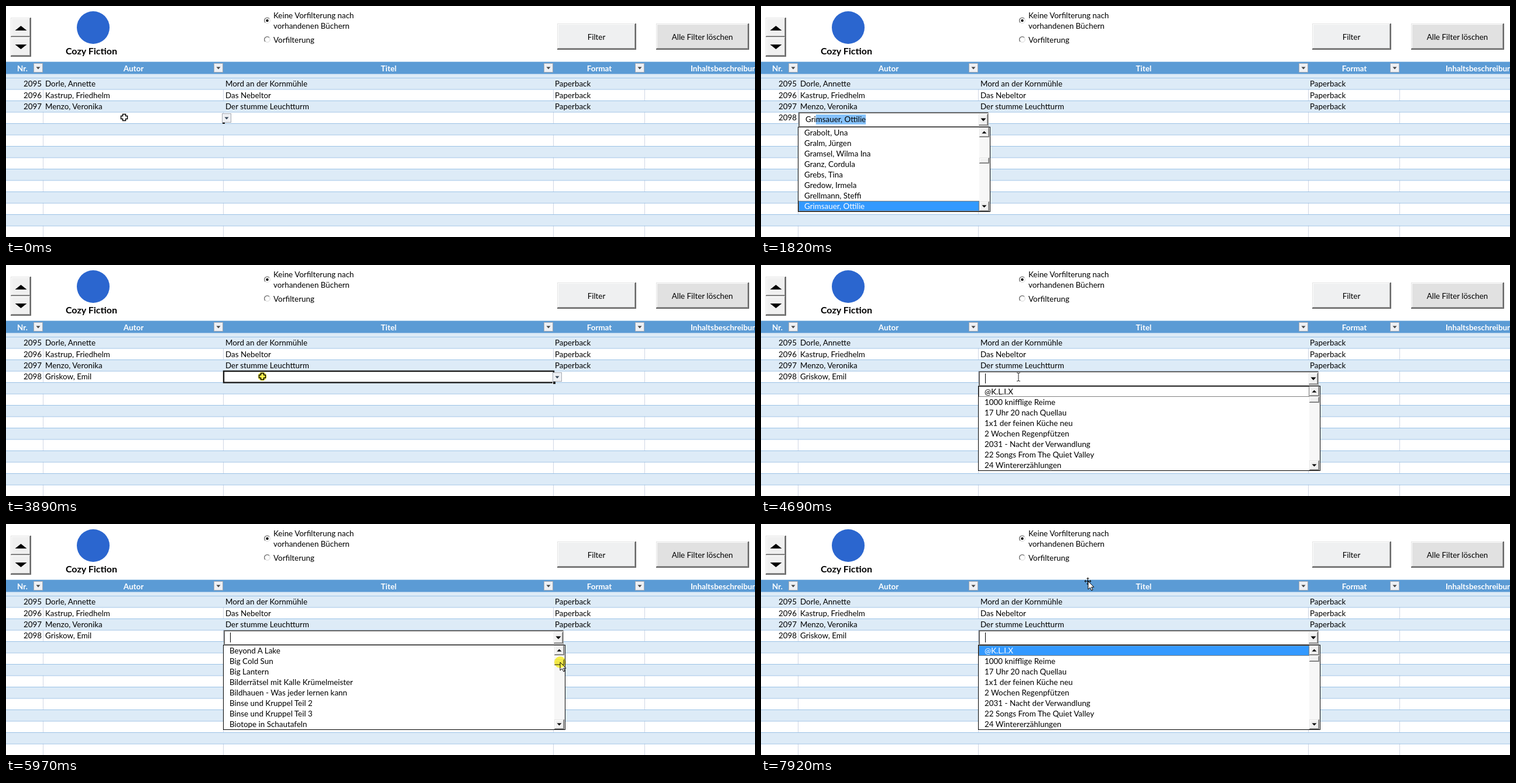
Write an HTML page that moves like this. It is 1280x396 px and loops after 8000 ms.

```html
<!DOCTYPE html>
<html lang="de">
<head>
<meta charset="utf-8">
<title>Bücherliste</title>
<style>
  html, body { margin: 0; width: 100%; height: 100%; overflow: hidden; background: #fff; }
  svg { display: block; width: 1280px; height: 396px; }
  text { font: 13.4px Lato, "Open Sans", sans-serif; white-space: pre; }
  .bold { font-weight: 700; }
  .halo { fill: #fff200; fill-opacity: .7; mix-blend-mode: multiply; }
</style>
</head>
<body>
<svg id="stage" viewBox="0 0 1280 396"><g id="sheet"></g><g id="live"></g></svg>
<script>
const LOOP = 8000;
const COLS = [63, 371, 935, 1091];
const AUTHOR = { x: 64, right: 391 };
const TITLE = { x: 372, right: 955 };
const BLUE = '#3399ff';

const books = [
  ['Dorle, Annette', 'Mord an der Kornmühle'],
  ['Kastrup, Friedhelm', 'Das Nebeltor'],
  ['Menzo, Veronika', 'Der stumme Leuchtturm']
];
const authors = [
  'Abelow, Jutta', 'Abrist, Konrad', 'Adelohm, Vera', 'Ahlpor, Sven', 'Aldruff, Monika',
  'Alpstein, Ruth', 'Amselt, Dirk', 'Andrusch, Karla', 'Fuhlen, Marek', 'Funtz, Berta',
  'Furlow, Denise', 'Fuxel, Sepp', 'Gabrun, Ilse', 'Gattmer, Rolf', 'Gellow, Nadja',
  'Gimpar, Tom', 'Gorbeck, Lutz', 'Grabolt, Una', 'Gralm, Jürgen', 'Gramsel, Wilma Ina',
  'Granz, Cordula', 'Grebs, Tina', 'Gredow, Irmela', 'Grellmann, Steffi',
  'Grimsauer, Ottilie', 'Grindo, Lore', 'Griskow, Emil'
];
const titles = [
  '@K.L.I.X', '1000 knifflige Reime', '17 Uhr 20 nach Quellau', '1x1 der feinen Küche neu',
  '2 Wochen Regenpfützen', '2031 - Nacht der Verwandlung', '22 Songs From The Quiet Valley',
  '24 Wintererzählungen', 'Abends am Mühlbach', 'Alle Wege nach Tannau', 'Am Ufer der Stille',
  'Bald kommt der Schnee', 'Beyond A Lake', 'Big Cold Sun', 'Big Lantern',
  'Bilderrätsel mit Kalle Krümelmeister', 'Bildhauen - Was jeder lernen kann',
  'Binse und Kruppel Teil 2', 'Binse und Kruppel Teil 3', 'Biotope in Schautafeln',
  'Blaue Tinte', 'Brot für den Riesen', 'Bunte Steine im Sand', 'Chor der Krähen', 'Crow Lane',
  'Cura lenta', 'Cuvo', 'Curious Trip Inland', 'Curvino', 'Cycle Of Lanterns',
  'Da singt das halbe Dorf', 'Da blieben noch fünf Äpfel'
];

// Timelines: the last entry whose time has passed is valid.
// Cursor: time, kind, x, y, radius of the click halo.
const cursorLine = [
  [0, 'cross', 202, 191], [270, 'beam', 202, 192], [1430, ''], [2590, 'cross', 202, 191],
  [2990, 'cross', 262, 192], [3110, 'cross', 390, 192], [3220, 'cross', 438, 191],
  [3370, 'cross', 438, 191, 7.5], [4020, 'cross', 438, 191], [4150, 'beam', 440, 192],
  [4920, 'beam', 466, 199], [5060, 'arrow', 700, 223], [5210, 'arrow', 860, 231],
  [5330, 'arrow', 926, 233], [5470, 'arrow', 942, 234], [5580, 'arrow', 946, 233],
  [5700, 'arrow', 946, 232, 10], [5860, 'arrow', 946, 235, 10], [5970, 'arrow', 947, 237, 10],
  [6130, 'arrow', 947, 238, 10], [6730, 'arrow', 946, 237, 10], [7030, 'arrow', 946, 232, 10],
  [7140, 'arrow', 946, 224, 10], [7260, 'arrow', 946, 216, 10], [7420, 'arrow', 946, 216],
  [7690, 'arrow', 885, 227], [7800, 'arrow', 722, 212], [7920, 'move', 559, 98]
];
const typedLine = [[0, 0], [1430, 1], [1690, 2], [1820, 3], [1950, 4], [2070, 5]];
const typedMatch = [0, 12, 17, 24, 26, 26];
const typedThumb = [226, 251, 257, 260, 260, 260];
const scrollLine = [
  [0, 0, 226], [5860, 7, 229], [5970, 12, 232], [6130, 15, 233], [6260, 17, 234],
  [6730, 21, 235], [6860, 24, 235], [7030, 18, 233], [7140, 8, 229], [7260, 0, 226]
];
const hoverLine = [[0, -1], [5060, 0], [5210, 1], [5860, -1], [7690, 1], [7800, 0]];
const caretLine = [
  [0, 0], [270, 1], [900, 0], [4150, 1], [5060, 0], [5580, 1],
  [6130, 0], [6730, 1], [7260, 0], [7690, 1]
];

const at = (line, t) => line.reduce((found, step) => step[0] <= t ? step : found).slice(1);

const rect = (x, y, w, h, fill, extra = '') =>
  `<rect x="${x}" y="${y}" width="${w}" height="${h}" fill="${fill}" ${extra}/>`;
const path = (d, fill, stroke = 'none', extra = '') =>
  `<path d="${d}" fill="${fill}" stroke="${stroke}" ${extra}/>`;
const label = (x, y, s, extra = '') => `<text x="${x}" y="${y}" ${extra}>${s}</text>`;
const centred = (x, y, s, extra = '') => label(x, y, s, `text-anchor="middle" ${extra}`);
const rowTop = i => 123 + 19.5 * i;

function triangle(x, y, r, h, dir = 1, fill = '#000') {
  return path(`M${x - r} ${y - dir * h / 2}H${x + r}L${x} ${y + dir * h / 2}Z`, fill);
}

function raised(x, y, w, h, fill = '#f0f0f0', edge = 1) {
  return rect(x, y, w, h, '#696969') + rect(x, y, w - edge, h - edge, '#e3e3e3') +
    rect(x + 1, y + 1, w - edge - 1, h - edge - 1, '#a0a0a0') +
    rect(x + 1, y + 1, w - edge - 2, h - edge - 2, '#fff') +
    rect(x + 2, y + 2, w - edge - 3, h - edge - 3, fill);
}

const filterButton = (x, y, mark = '#444') =>
  rect(x + .5, y + .5, 15, 15, '#eef0f4', 'stroke="#a5abb5"') + triangle(x + 8, y + 8.5, 3.5, 4, 1, mark);

function radio(y, on) {
  return `<circle cx="446.5" cy="${y}" r="4.7" fill="#fff" stroke="#d5d5d5"/>` +
    path(`M443 ${y + 3.5}A4.8 4.8 0 0 1 450 ${y - 3.5}`, 'none', '#707070', 'stroke-width="1.3"') +
    (on ? `<circle cx="446.5" cy="${y}" r="2.2"/>` : '');
}

function drawSheet() {
  let s = rect(0, 0, 1280, 396, '#fff');
  s += raised(8, 20, 35, 34, '#f0f0f0', 2) + triangle(25.5, 38, 10, 8, -1);
  s += raised(8, 53, 35, 34, '#f0f0f0', 2) + triangle(25.5, 70, 10, 8);
  s += '<circle cx="149" cy="37" r="28" fill="#2b66cf"/>';
  s += centred(146, 83, 'Cozy Fiction', 'class="bold" style="font-size:16px"');
  s += radio(25, true) + radio(57.5, false);
  s += label(457, 21, 'Keine Vorfilterung nach') + label(457, 39, 'vorhandenen Büchern') +
    label(457, 63, 'Vorfilterung');
  s += raised(942, 30, 135, 45, '#eff0f1', 2) + centred(1009, 58, 'Filter');
  s += raised(1111, 30, 159, 45, '#e1e1e1', 2) + centred(1190, 58, 'Alle Filter löschen');

  s += rect(0, 116, 1280, 8, '#ddebf7') + rect(0, 95.6, 1280, 20.4, '#5b9bd5') +
    rect(0, 116, 1280, 1, '#9bc2e6');
  const head = 'class="bold" fill="#fff"';
  [[28, 'Nr.'], [218, 'Autor'], [654, 'Titel'], [1014, 'Format']]
    .forEach(([x, name]) => s += centred(x, 112, name, head));
  s += label(1170, 112, 'Inhaltsbeschreibung', head);
  COLS.forEach(x => s += filterButton(x - 16, 98));

  for (let i = 0; i < 14; i++) {
    if (i % 2) COLS.forEach(x => s += rect(x, rowTop(i), 1, 19.5, '#d0d7e5'));
    else s += rect(0, rowTop(i), 1280, 19.5, '#ddebf7');
  }
  for (let i = 0; i < 14; i++) s += rect(0, rowTop(i), 1280, 1, '#9bc2e6');
  books.forEach(([author, title], i) => {
    const y = Math.round(138 + 19.5 * i);
    s += label(61, y, 2095 + i, 'text-anchor="end"') + label(67, y, author) +
      label(375, y, title) + label(938, y, 'Paperback');
  });
  return s;
}

const selection = (x, right) =>
  rect(x, 182, right - x, 19.5, 'none', 'stroke="#1a1a1a" stroke-width="2.4"') +
  rect(right - 2, 199, 5, 5, '#fff') + rect(right - 1, 200, 4, 4, '#1a1a1a');

function comboField({ x, right }, caret) {
  const r = right - 2;
  return rect(x, 182, r - x, 25, '#a8a8a8') + rect(x, 182, r - x - 1, 24, '#666') +
    rect(x + 2, 184, r - x - 3, 22, '#fff') +
    raised(r - 17, 185, 16, 20) + triangle(r - 9, 195, 4.5, 5) +
    (caret ? rect(x + 11, 186, 1, 17, '#000') : '');
}

function comboList({ x, right }, names, first, chosen, thumb, focus) {
  const bar = right - 18, w = bar - x - 1;
  let s = rect(x - .5, 207.5, right - x + 1, 145, '#fff', 'stroke="#000"');
  names.slice(first, first + 8).forEach((name, i) => {
    const y = 208 + 18 * i, on = i === chosen;
    if (on) s += rect(x, y, w + 1, 18, BLUE);
    if (on || i === focus)
      s += rect(x + .5, y + .5, w, 17, 'none', `stroke="${on ? '#c60' : '#000'}" stroke-dasharray="1 1"`);
    s += label(x + 10, y + 14, name, on ? 'fill="#fff"' : '');
  });
  return s + rect(bar, 208, 17, 144, '#f7f7f7') +
    raised(bar, 208, 17, 17) + triangle(bar + 8.5, 216.5, 4, 4, -1) +
    raised(bar, 335, 17, 17) + triangle(bar + 8.5, 343.5, 4, 4) +
    raised(bar, thumb, 17, 10);
}

const pen = document.createElement('canvas').getContext('2d');
function textWidth(s) {
  pen.font = '13.4px Lato, "Open Sans", sans-serif';
  return pen.measureText(s).width;
}

function typedText(count, name) {
  const start = 76 + textWidth(name.slice(0, count));
  return rect(start, 186, 76 + textWidth(name) - start, 17, '#86c2fb') + label(76, 199, name);
}

function drawCursor([kind, x, y, halo = 0]) {
  const arrow = path('M0 0V14L3.4 11L5.8 16L8 15L5.7 10.2H10Z', '#fff', '#000');
  const shapes = {
    cross: path('M-2.5-5.5H2.5V-2.5H5.5V2.5H2.5V5.5H-2.5V2.5H-5.5V-2.5H-2.5Z', '#fff', '#000', 'stroke-width="1.5"'),
    beam: path('M-3-7H-1L0-6L1-7H3M0-6V6M-3 7H-1L0 6L1 7H3', 'none', '#222'),
    arrow,
    move: path('M-6 0H5M-.5-6V6M-4-2L-6 0L-4 2M3-2L5 0L3 2M-2.5-4L-.5-6L1.5-4M-2.5 4L-.5 6L1.5 4', 'none', '#000') + arrow
  };
  if (!kind) return '';
  return `<g style="mix-blend-mode:normal" transform="translate(${x} ${y})">${shapes[kind]}</g>` +
    `<circle class="halo" cx="${x}" cy="${y}" r="${halo}"/>`;
}

function drawLive(t) {
  let s = '';
  const [typed] = at(typedLine, t), [caret] = at(caretLine, t);
  if (typed && t < 2590 || t >= 2590) s += label(61, 196, 2098, 'text-anchor="end"');

  if (t < 270) {
    s += t < 120 ? rect(370, 199, 4, 3, '#1a1a1a') : selection(63, 372);
    s += filterButton(369, 184, '#345');
  } else if (t < 2590) {
    const match = typedMatch[typed], first = Math.max(0, match - 7);
    s += comboField(AUTHOR, caret);
    if (typed) s += typedText(typed, authors[match]);
    if (t >= 400)
      s += comboList(AUTHOR, authors, first, typed ? match - first : -1, typedThumb[typed], typed ? -1 : 0);
  } else {
    s += label(67, 196, authors[26]);
    if (t < 4520) s += selection(372, 936);
    if (t < 4150) s += filterButton(934, 184, '#345');
    else s += comboField(TITLE, caret);
    if (t >= 4690) {
      const [first, thumb] = at(scrollLine, t), [hover] = at(hoverLine, t);
      s += comboList(TITLE, titles, first, hover, thumb, first || hover > 0 ? -1 : 0);
    }
  }
  return s + drawCursor(at(cursorLine, t));
}

const live = document.getElementById('live');
document.getElementById('sheet').innerHTML = drawSheet();
let shown = '';
function frame() {
  const picture = drawLive(performance.now() % LOOP);
  if (picture !== shown) live.innerHTML = shown = picture;
  requestAnimationFrame(frame);
}
frame();
</script>
</body>
</html>
```
